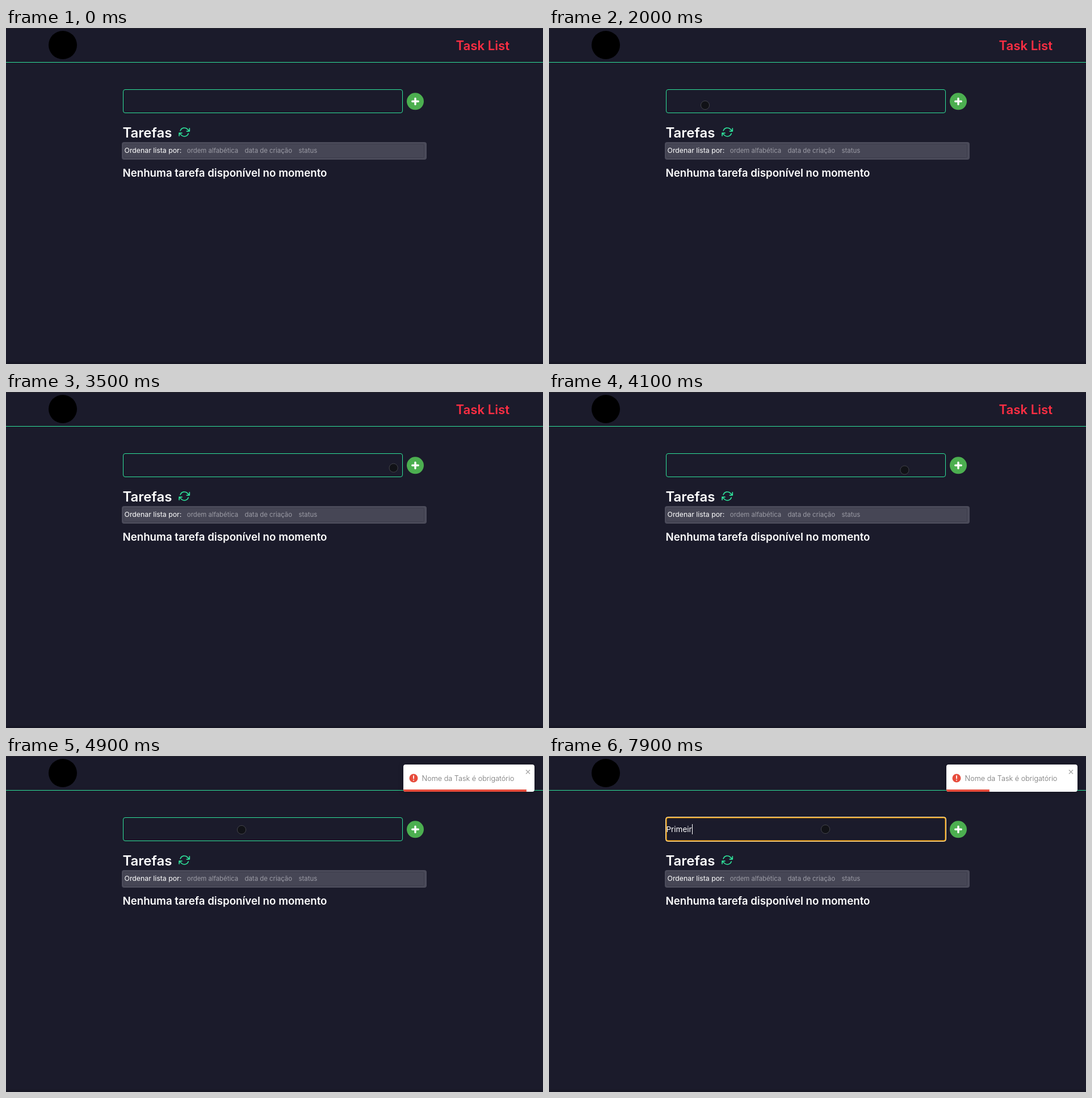
These frames come from a looping animation (946 px wide and 592 px high, 8 s). An HTML page:

```html
<!DOCTYPE html>
<html lang="pt-BR">
<head>
<meta charset="utf-8">
<title>Task List</title>
<style>
  html, body { margin: 0; width: 100%; height: 100%; overflow: hidden; background: #1b1b2b; }
  svg { display: block; width: 100vw; height: 100vh; font-family: Inter, "Open Sans", sans-serif; }
  .heading { fill: #fff; font-weight: 600; }
  .option { fill: #9b9ba5; font-size: 11.4px; }
  .line { fill: none; stroke: #2fe39b; }
  #toast { filter: drop-shadow(0 1px 4px rgba(0, 0, 0, .25)); }
</style>
</head>
<body>
<svg viewBox="0 0 946 592">
  <rect width="946" height="592" fill="#1b1b2b"/>
  <rect width="946" height="1" fill="#28282f"/>
  <rect y="588" width="946" height="4" fill="#171725"/>

  <circle cx="100" cy="30" r="25" fill="#000"/>
  <text x="792.5" y="39" font-size="22.2" font-weight="600" fill="#ff2e43">Task List</text>
  <path class="line" d="M0 60.5H946"/>

  <rect class="line" x="206.5" y="108.5" width="492" height="41" rx="3.5"/>
  <g id="focus" fill="none">
    <rect x="206.5" y="108.5" width="492" height="41" rx="3" stroke="#f5a30f" stroke-width="2"/>
    <rect x="205.5" y="107.5" width="494" height="43" rx="4" stroke="#ffe3ac"/>
  </g>
  <text id="typed" x="206.5" y="134" font-size="13.5" fill="#fff"></text>
  <rect id="caret" y="120" width="1" height="18" fill="#fff"/>

  <g id="add">
    <circle r="15" fill="#4caf50"/>
    <path d="M-5.2 0H5.2M0-5.2V5.2" stroke="#fff" stroke-width="3.4" stroke-linecap="round"/>
  </g>

  <text class="heading" x="205.5" y="193" font-size="24">Tarefas</text>
  <g class="line" transform="translate(304.2 173.5) scale(.83)" stroke-width="2" stroke-linecap="round" stroke-linejoin="round">
    <path d="M23 4v6h-6M1 20v-6h6M3.51 9a9 9 0 0 1 14.85-3.36L23 10M1 14l4.64 4.36A9 9 0 0 0 20.49 15"/>
  </g>

  <rect x="204" y="201" width="537" height="31" rx="4" fill="#4b4b5a"/>
  <rect x="207.5" y="204.5" width="529" height="24" rx="1" fill="#464655" stroke="#3c3c4b"/>
  <text x="208.5" y="220" font-size="12.3" fill="#fff">Ordenar lista por:</text>
  <text class="option" x="318.8" y="220">ordem alfabética</text>
  <text class="option" x="420.5" y="220">data de criação</text>
  <text class="option" x="515.5" y="220">status</text>
  <text class="heading" x="205.5" y="262" font-size="18.7">Nenhuma tarefa disponível no momento</text>

  <g id="toast">
    <clipPath id="card"><rect x="700" y="15" width="231" height="48" rx="4"/></clipPath>
    <g clip-path="url(#card)">
      <rect x="700" y="15" width="231" height="48" fill="#fff"/>
      <rect id="progress" x="700" y="59" height="4" fill="#e74c3c"/>
    </g>
    <circle cx="718" cy="39" r="7.5" fill="#e74c3c"/>
    <path d="M718 34.8v4.8M718 42.6v.2" stroke="#fff" stroke-width="1.8" stroke-linecap="round"/>
    <text x="732.5" y="44" font-size="12.7" font-weight="300" fill="#707070">Nome da Task é obrigatório</text>
    <path d="M916 24.5l7 7M923 24.5l-7 7" stroke="#a8a8a8" stroke-width="1.4"/>
  </g>

  <circle id="cursor" r="7.6" fill="#111217" stroke="#42434a"/>
</svg>
<script>
const LOOP = 8000, STEP = 100;
const [focusRing, typed, caret, add, toast, progress, cursor] =
  ["focus", "typed", "caret", "add", "toast", "progress", "cursor"]
    .map(id => document.getElementById(id));

// Pointer stops; each move slows down into the next stop.
const STOPS = [
  { at: 1400, x: 321, y: 32 },
  { at: 1700, x: 367, y: 150 },
  { at: 2000, x: 275, y: 136 },
  { at: 2600, x: 334, y: 131 },
  { at: 3000, x: 334, y: 131 },
  { at: 3700, x: 721, y: 134 },
  { at: 3900, x: 721, y: 141 },
  { at: 4900, x: 415, y: 130 },
  { at: 5200, x: 375, y: 130 },
  { at: 5700, x: 487, y: 129 }
];
const CLICK = 3900, TOAST_IN = 4200, TOAST_SET = 4600, FOCUS = 5700;
const WORD = "Primeir", TYPE_START = 6600, KEY_GAP = 215;

const easeOut = k => Math.sin(k * Math.PI / 2);

function pointerAt(t) {
  const next = STOPS.findIndex(stop => stop.at > t);
  if (next < 0) return STOPS[STOPS.length - 1];
  if (next === 0) return STOPS[0];
  const a = STOPS[next - 1], b = STOPS[next];
  const k = easeOut((t - a.at) / (b.at - a.at));
  return { x: a.x + (b.x - a.x) * k, y: a.y + (b.y - a.y) * k };
}

function show(el, visible) {
  el.style.display = visible ? "" : "none";
}

function render(t) {
  const { x, y } = pointerAt(t);
  cursor.setAttribute("transform", `translate(${x} ${y})`);
  show(cursor, t >= STOPS[0].at);

  const hover = t >= CLICK && t < CLICK + 200;
  add.setAttribute("transform", `translate(721 129.3) scale(${hover ? 1.2 : 1})`);

  // The toast swings in and settles.
  const age = t - TOAST_IN;
  const shift = 170 * Math.exp(-age / 60) * Math.cos(Math.PI * age / 125);
  show(toast, age >= 0);
  if (age >= 0) toast.setAttribute("transform", `translate(${shift} 0)`);
  progress.setAttribute("width", Math.min(231, 231 - (t - TOAST_SET) * .047));

  show(focusRing, t >= FOCUS);
  const count = Math.max(0, Math.floor((t - TYPE_START) / KEY_GAP) + 1);
  typed.textContent = WORD.slice(0, count);
  show(caret, count > 0);
  if (count) caret.setAttribute("x", Math.round(206.5 + typed.getComputedTextLength()));
}

let start, last = -1;
function frame(now) {
  start ??= now;
  const tick = Math.floor((now - start) % LOOP / STEP);
  if (tick !== last) render((last = tick) * STEP);
  requestAnimationFrame(frame);
}
render(0);
requestAnimationFrame(frame);
</script>
</body>
</html>
```
